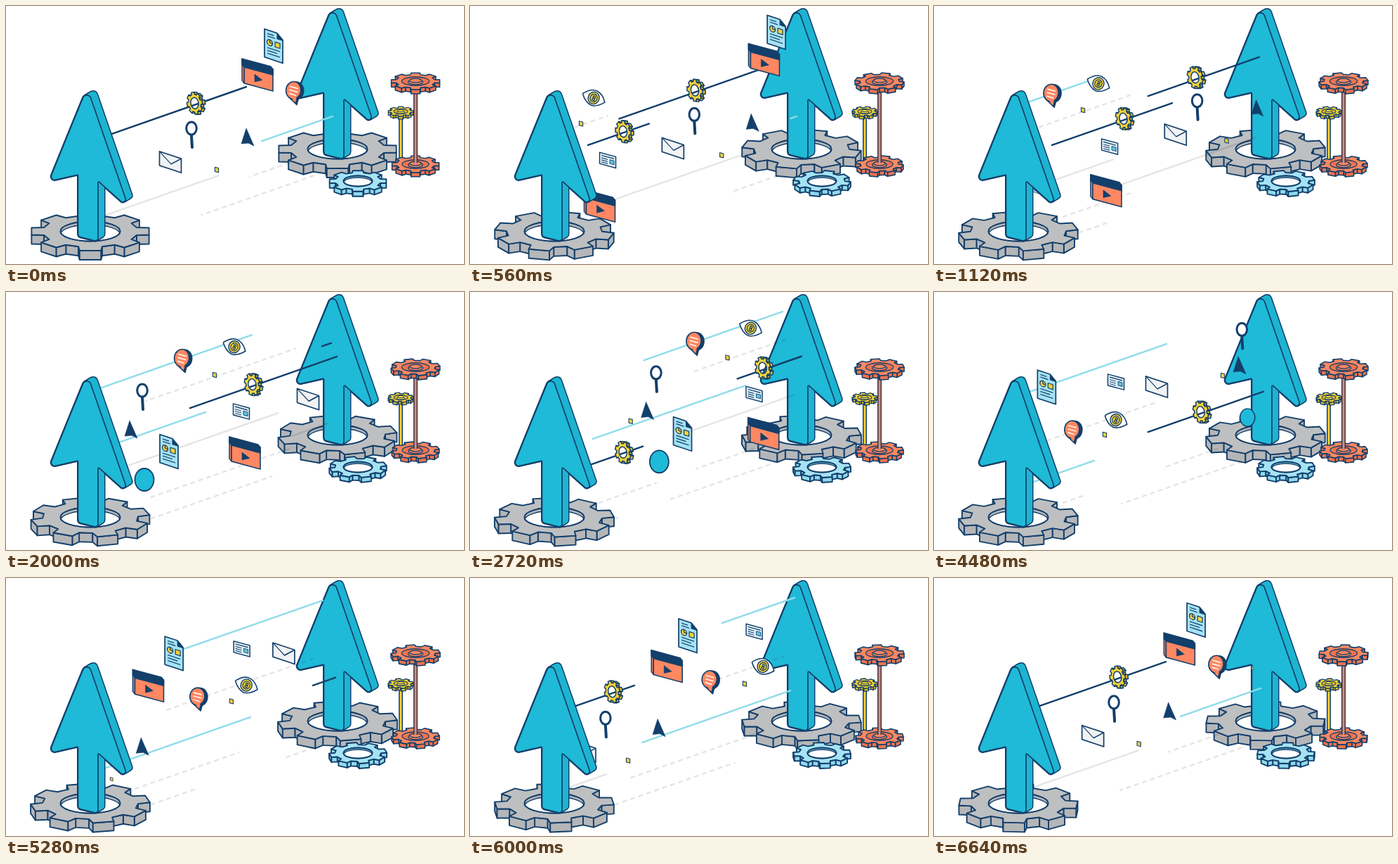
Recreate the animation shown at these times as an HTML page with a canvas. Size 652x367 px, loop 6.72 s.

```html
<!DOCTYPE html>
<html lang="en">
<head>
<meta charset="utf-8">
<style>
html, body { margin: 0; width: 100%; height: 100%; overflow: hidden; background: #fff; }
canvas { display: block; }
</style>
</head>
<body>
<canvas id="stage" width="652" height="367"></canvas>
<script>
const c = document.getElementById('stage').getContext('2d');
const LOOP = 6720, STEP = 80, SLOPE = 0.355;
const NAVY = '#133f6b', TEAL = '#1fbad7', TEAL_SIDE = '#1db4d1', SKY = '#a5e3f4',
  ORANGE = '#ff8862', YELLOW = '#f6d137', PALE = '#8edcea', GREY = '#e5e5e5';

c.lineJoin = 'round';

// signed time since `ref`, wrapped to half a loop either way
const since = (t, ref) => ((t - ref + LOOP * 1.5) % LOOP) - LOOP / 2;
const clamp01 = v => Math.max(0, Math.min(1, v));

function paint(fill, width = 1.6, stroke = NAVY) {
  if (fill) { c.fillStyle = fill; c.fill('evenodd'); }
  if (width) { c.strokeStyle = stroke; c.lineWidth = width; c.stroke(); }
}
function poly(pts, fill, width, stroke) {
  c.beginPath();
  pts.forEach(p => c.lineTo(p[0], p[1]));
  c.closePath();
  paint(fill, width, stroke);
}
function oval(x, y, rx, ry, fill, width, stroke) {
  c.beginPath();
  c.ellipse(x, y, rx, ry, 0, 0, 7);
  paint(fill, width, stroke);
}
function seg(x1, y1, x2, y2, width = 1.3, stroke = NAVY) {
  c.beginPath();
  c.moveTo(x1, y1);
  c.lineTo(x2, y2);
  paint(null, width, stroke);
}
const box = (x, y, w, h, fill, width, stroke) =>
  poly([[x, y], [x + w, y], [x + w, y + h], [x, y + h]], fill, width, stroke);

// ---- gears: flat toothed face extruded along (dx, dy) ----
function gear(g, spin) {
  const { x, y, rx, ry, dx, dy, face, side, hole = 0.5, width = 1.7 } = g;
  const pts = [];
  for (let i = 0; i < 8; i++)
    for (const [a, r] of [[-0.25, 0.8], [-0.18, 1], [0.18, 1], [0.25, 0.8]]) {
      const q = spin + i * Math.PI / 4 + a;
      pts.push([x + rx * r * Math.cos(q), y + ry * r * Math.sin(q)]);
    }
  const walls = [];
  pts.forEach((p, i) => {
    const q = pts[(i + 1) % pts.length];
    if ((q[1] - p[1]) * dx - (q[0] - p[0]) * dy > 0)
      walls.push({ p, q, depth: (p[0] + q[0]) * dx + (p[1] + q[1]) * dy });
  });
  walls.sort((a, b) => a.depth - b.depth);
  for (const { p, q } of walls)
    poly([p, q, [q[0] + dx, q[1] + dy], [p[0] + dx, p[1] + dy]], side, width);
  c.beginPath();
  pts.forEach(p => c.lineTo(p[0], p[1]));
  c.closePath();
  if (!g.boss) {
    c.moveTo(x + rx * hole, y);
    c.ellipse(x, y, rx * hole, ry * hole, 0, 0, Math.PI * 2);
  }
  paint(face, width);
  if (g.boss) {
    oval(x, y, rx * 0.56, ry * 0.52, side, width * 0.8);
    oval(x, y + 1, rx * 0.3, ry * 0.3, face, width * 0.8);
    oval(x, y - 1, rx * 0.24, ry * 0.24, face, width * 0.7);
  } else if (g.solid) {
    c.save();
    c.beginPath();
    c.ellipse(x, y, rx * hole, ry * hole, 0, 0, 7);
    c.clip();
    c.fillStyle = side;
    c.fill();
    oval(x, y + dy * 0.35, rx * hole, ry * hole, '#fff', width * 0.8);
    c.restore();
    oval(x, y, rx * hole, ry * hole, null, width);
  }
}
const flat = (x, y, rx, ry, dy, face, side, more) =>
  ({ x, y, rx, ry, dx: 0, dy, face, side, ...more });
const grey = { solid: true, width: 1.9 };
const leftGear = flat(120, 320.5, 85, 28, 13, '#bebfc0', '#b5b6b8', grey);
const rightGear = flat(472, 203.5, 85, 28, 13, '#bebfc0', '#b5b6b8', grey);
const skyGear = flat(501, 249, 41, 15, 7, SKY, '#8fd9ee', { solid: true, width: 1.9 });
const topGear = flat(583, 107, 35, 12, 6, ORANGE, '#f0734d', { boss: true, width: 1.6 });
const lowGear = flat(583, 225, 34, 12, 6, ORANGE, '#f0734d', { boss: true, width: 1.6 });
const sunGear = flat(562, 150, 18, 7, 4, YELLOW, '#e5bd22', { boss: true, width: 1.3 });
const iconGear = { x: -1.5, y: 0, rx: 11, ry: 16, dx: 4, dy: 1, face: YELLOW, side: '#e8c024', width: 1.5 };

// ---- big arrows ----
const arrowCorners = [[115.5, 116, 6], [175, 288, 4], [131, 249, 1], [131, 335, 4],
  [102.5, 328, 5], [102.5, 240, 1], [61, 249.5, 5]];
function arrowPath(dx, dy) {
  c.beginPath();
  c.moveTo(88 + dx, 183 + dy);
  arrowCorners.forEach(([x, y, r], i) => {
    const n = arrowCorners[(i + 1) % arrowCorners.length];
    c.arcTo(x + dx, y + dy, n[0] + dx, n[1] + dy, r);
  });
  c.closePath();
}
function arrow(dx, dy) {
  const layers = draw => {
    for (let k = 9; k >= 0; k--) { arrowPath(dx + k, dy - k * 0.6); draw(); }
  };
  layers(() => paint(NAVY, 3));
  layers(() => paint(TEAL_SIDE, 0));
  arrowPath(dx, dy);
  paint(TEAL, 1.7);
}

// ---- travelling lines: [time with head at x 342, y there, right end, left end] ----
const lines = [
  [NAVY, 2.4, [[0, 115, 463], [1140, 137, 472, 168], [3360, 186, 469]]],
  [PALE, 2.4, [[1947, 64, 445], [2387, 150.5, 435], [4553, 70, 462], [5240, 200, 465]]],
  [GREY, 2.4, [[265, 227.5, 457], [1700, 188, 461]]],
  [GREY, 2.4, [[1527, 105, 450], [4640, 148, 447], [1500, 244.5, 410], [3227, 244.5, 410],
    [5347, 244.5, 410], [1753, 275, 440], [3593, 275, 440], [5765, 275, 440]], [7, 5]],
];
function drawLines(t) {
  c.save();
  for (const [color, width, list, dash] of lines) {
    c.setLineDash(dash || []);
    c.lineCap = dash ? 'butt' : 'round';
    c.globalCompositeOperation = color === GREY ? 'multiply' : 'source-over';
    for (const [ref, y, end, start = 115] of list) {
      const p = since(t, ref);
      const head = Math.min(end, 342 + 0.15 * p), tail = Math.max(start, 120 + 0.165 * p);
      const at = x => y - 0.35 * (x - 342);
      // the dash pattern stays anchored to the path
      c.lineDashOffset = (tail - start) * 1.06;
      if (head > tail + 4) seg(tail, at(tail), head, at(head), width, color);
    }
  }
  c.restore();
}

// ---- small icons, centred on the origin ----
const skew = k => c.transform(1, k, 0, 1, 0, 0);
const icons = {
  gear(spin) {
    c.rotate(-0.18);
    gear(iconGear, spin);
  },
  doc() {
    skew(0.33);
    poly([[-13, -20], [5, -20], [13, -13], [13, 20], [-13, 20]], SKY, 1.7);
    poly([[5, -20], [5, -12], [13, -12]], NAVY, 1);
    seg(-9, -15, 0, -15);
    seg(-9, -11.5, 2, -11.5);
    oval(-5.5, -3, 4, 4.2, YELLOW, 1.3);
    seg(-5.5, -3, -5.5, -7);
    seg(-5.5, -3, -2, -3);
    box(2, -6.5, 7, 7, YELLOW, 1.2);
    seg(-9, 5, 9, 5);
    seg(-9, 9, 5, 9);
    seg(-9, 13, 9, 13);
  },
  video() {
    skew(0.27);
    poly([[-22, -17], [-19, -14], [-19, 17], [-22, 14]], ORANGE, 1.5);
    box(-19, -14, 41, 31, ORANGE, 1.6);
    poly([[-22, -17], [19, -17], [22, -14], [22, -6], [-19, -6], [-22, -9]], NAVY, 1.6);
    poly([[-4, 0], [7, 5.5], [-4, 11]], NAVY, 0.5);
  },
  chat() {
    c.rotate(0.1);
    oval(2.5, -3.5, 10.8, 12.8, NAVY, 1.6);
    poly([[-3, 8], [7, 7], [5.5, 16]], NAVY, 1.6);
    poly([[-6, 7], [5, 7], [3.5, 14.5]], ORANGE, 1.5);
    oval(-1.2, -4, 10.6, 12.4, ORANGE, 1.6);
    poly([[-4, 6], [4, 6], [3, 12]], ORANGE, 0);
    for (const y of [-9, -4, 1]) seg(-7, y, y > 0 ? 3 : 5, y + 2, 1.5, '#fff');
  },
  plane() { poly([[-2, -13], [9, 12], [1, 8], [-9, 9]], NAVY, 0.6); },
  mag() {
    c.lineCap = 'round';
    seg(0, 1, 1, 18, 4);
    oval(0, -9, 7.3, 9, '#fff', 3);
    c.lineCap = 'butt';
  },
  mail() {
    skew(0.33);
    box(-15.5, -10, 31, 20, '#f1f2f3', 1.7);
    c.beginPath();
    c.moveTo(-15.5, -10);
    c.lineTo(1, 2.5);
    c.lineTo(15.5, -10);
    paint(null, 1.4);
  },
  square() {
    skew(0.25);
    box(-2.6, -3, 5.2, 6, YELLOW, 1.1);
  },
  eye() {
    c.rotate(0.38);
    c.beginPath();
    c.moveTo(-17, 0);
    c.quadraticCurveTo(-8, -12, 1, -11);
    c.quadraticCurveTo(10, -10, 17, 0);
    c.quadraticCurveTo(8, 11, 0, 11);
    c.quadraticCurveTo(-9, 10, -17, 0);
    paint('#fff', 1.6);
    oval(0, 0, 8, 8.6, YELLOW, 1.4);
    oval(0, 0, 5, 5.6, YELLOW, 1.2);
    oval(0.3, -1.7, 1.6, 1.5, YELLOW, 1.3);
    oval(0.3, 1.9, 1.8, 1.6, YELLOW, 1.3);
  },
  card() {
    skew(0.27);
    box(-11.5, -8, 23, 16, '#e8f6fa', 1.5);
    seg(-9, -4.5, 9, -4.5, 1.4);
    for (const y of [-1, 2, 5]) seg(-9, y, 0, y, 1.1);
    box(3, -1.5, 6, 5.5, '#5cc8e0', 0.9);
  },
  coin() { oval(0, 0, 13.5, 16, TEAL, 1.8); },
};

// [icon, reference time, x, y, px per ms, x where it vanishes, x where it appears]
const tracks = [
  ['gear', 0, 270, 138, 0.092, 450], ['gear', 1120, 271, 160, 0.092, 450, 170],
  ['gear', 3360, 278, 207, 0.092, 450],
  ['video', 0, 358, 98, 0.108], ['video', 2000, 340, 229, 0.108],
  ['doc', 0, 381, 57, 0.0985], ['doc', 2000, 232, 227, 0.098],
  ['chat', 0, 410, 124, 0.095], ['chat', 2000, 251, 98, 0.095],
  ['plane', 0, 344, 187, 0.104, 479], ['plane', 2000, 178, 196, 0.1037, 479],
  ['mag', 0, 264, 183, 0.0988], ['mag', 2000, 194, 149, 0.0985],
  ['mail', 0, 234, 222, 0.098], ['mail', 4480, 317, 135, 0.098],
  ['square', 0, 300, 233, 0.104], ['square', 2000, 297, 118, 0.0965],
  ['square', 4480, 243, 203, 0.0973], ['square', 4480, 411, 119, 0.1036],
  ['eye', 2000, 325, 78, 0.1034], ['eye', 4480, 259, 182, 0.104],
  ['card', 2000, 335, 170, 0.0965], ['card', 4480, 259, 128, 0.0958],
  ['coin', 2000, 197, 267, 0.1005],
];
function drawIcons(t, spin) {
  for (const [name, ref, x0, y0, speed, end = 462, start = 140] of tracks) {
    const dx = speed * since(t, ref), x = x0 + dx;
    const scale = Math.min(clamp01((x - start) / 14), clamp01((end - x) / 20));
    if (!scale) continue;
    c.save();
    c.translate(x, y0 - SLOPE * dx);
    c.scale(scale, scale);
    icons[name](spin);
    c.restore();
  }
}

function post(x, y1, y2, color) {
  seg(x, y1, x, y2, 6);
  seg(x, y1, x, y2, 3, color);
}

function draw(t) {
  const spin = Math.PI / 2 - t / LOOP * Math.PI * 2;
  c.fillStyle = '#fff';
  c.fillRect(0, 0, 652, 367);

  gear(rightGear, spin);
  gear(skyGear, spin);
  arrow(350, -117);
  post(562, 156, 220, YELLOW);
  gear(lowGear, spin);
  post(583, 118, 223, ORANGE);
  gear(sunGear, spin);
  gear(topGear, spin);

  drawLines(t);
  drawIcons(t, spin);

  gear(leftGear, spin);
  arrow(0, 0);
}

function tick() {
  draw(Math.floor(performance.now() % LOOP / STEP) * STEP);
  requestAnimationFrame(tick);
}
tick();
</script>
</body>
</html>
```
